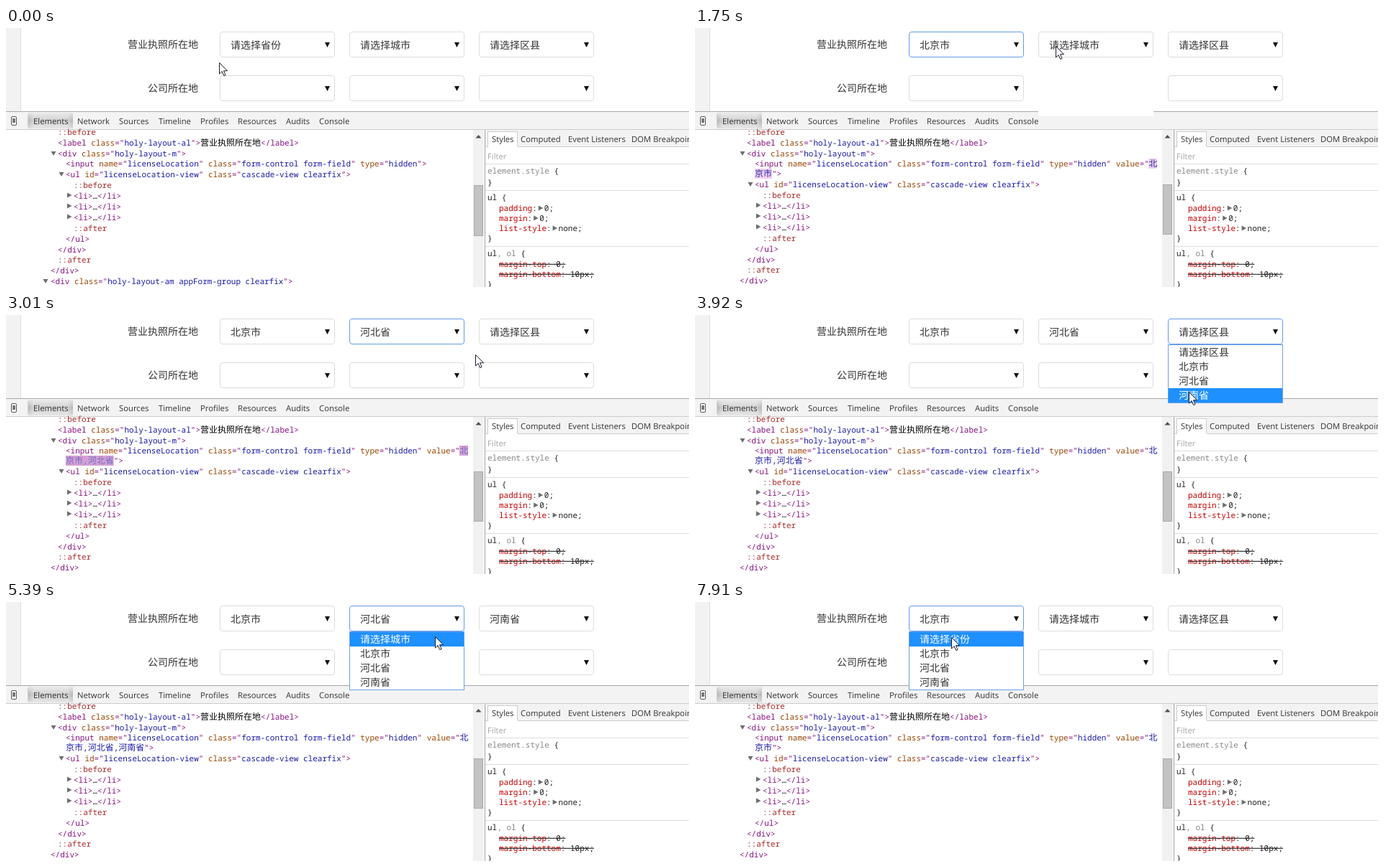
Recreate the animation shown at these times as an HTML page. Size 949 by 361 pixels, loop 8000 ms.

```html
<!DOCTYPE html>
<html lang="zh-CN">
<head>
<meta charset="utf-8">
<title>Cascade select</title>
<style>
html, body { margin: 0; width: 100%; height: 100%; overflow: hidden; background: #fff; }
svg { display: block; width: 949px; height: 361px; }
text { white-space: pre; text-rendering: geometricPrecision; }
.form { font: 14px "Noto Sans CJK SC", "Noto Sans CJK JP", sans-serif; fill: #333; }
.ui { font: 11.3px "Open Sans", "Noto Sans", sans-serif; fill: #333; }
.code { font: 11px "Noto Sans Mono", "DejaVu Sans Mono", monospace; fill: #881280; }
.css { font: 11px "Noto Sans Mono", "DejaVu Sans Mono", monospace; fill: #222; }
.zh { font: 12px "Noto Sans CJK SC", "Noto Sans CJK JP", sans-serif; }
.name { fill: #994500; }
.val { fill: #1a1aa6; }
.pseudo { fill: #a52a2a; }
.txt { fill: #000; }
.prop { fill: #c80000; }
.dim { fill: #888; }
.off { text-decoration: line-through; }
.tri { fill: #6e6e6e; }
</style>
</head>
<body>
<svg viewBox="0 0 949 361">
  <defs>
    <linearGradient id="tab">
      <stop offset="0" stop-color="#b4b4b4"/>
      <stop offset=".12" stop-color="#d2d2d2"/>
      <stop offset=".88" stop-color="#d2d2d2"/>
      <stop offset="1" stop-color="#b4b4b4"/>
    </linearGradient>
    <linearGradient id="shade" x2="0" y2="1">
      <stop offset="0" stop-color="#f3f3f3" stop-opacity=".75"/>
      <stop offset=".5" stop-color="#f3f3f3" stop-opacity="0"/>
      <stop offset="1" stop-color="#f3f3f3" stop-opacity=".6"/>
    </linearGradient>
  </defs>
  <rect width="949" height="361" fill="#fff"/>
  <rect width="20" height="116" fill="#f2f2f2"/>
  <rect x="20" width="1" height="116" fill="#ddd"/>
  <g id="fixed"></g>
  <g id="live"></g>
</svg>
<script>
const STEP = 70, LOOP = 8000, COLS = [297, 477, 657];
const PROMPTS = ['请选择省份', '请选择城市', '请选择区县'];
const PLACES = ['北京市', '河北省', '河南省'];

// time, x, y of the pointer
const PATH = [
  [0, 296, 48], [350, 345, 24], [420, 345, 24], [770, 379, 62], [980, 379, 62],
  [1750, 501, 25], [2030, 501, 25], [2380, 508, 86], [2520, 508, 86], [3010, 652, 55],
  [3220, 686, 27], [3430, 686, 27], [3920, 686, 107], [3990, 686, 107], [4830, 598, 25],
  [4970, 598, 25], [5390, 596, 48], [6020, 596, 48], [6510, 582, 52], [6790, 362, 25],
  [7490, 362, 25], [7700, 357, 41], [7770, 357, 41], [7910, 356, 49]
];
// blank popup, list shown, closed, column
const POPUPS = [
  [350, 420, 980, 0], [1750, 1820, 2590, 1], [3360, 3430, 4060, 2],
  [4830, 4900, 6090, 1], [7000, 7070, LOOP, 0]
];
// time of change, chosen option per column
const CHOICES = [
  [0, [0, 0, 0]], [980, [1, 0, 0]], [2590, [1, 2, 0]], [4060, [1, 2, 3]], [6090, [1, 0, 0]]
];
// the highlight stalls while a menu opens
const STALLS = [[1750, 2100], [3220, 3430], [6790, 7210]];

const $ = id => document.getElementById(id);
const rect = (x, y, w, h, fill, more = '') =>
  `<rect x="${x}" y="${y}" width="${w}" height="${h}" fill="${fill}" ${more}/>`;
const text = (cls, x, y, s, more = '') => `<text class="${cls}" x="${x}" y="${y}" ${more}>${s}</text>`;
const span = (cls, s) => `<tspan class="${cls}">${s}</tspan>`;
const zh = s => s.replace(/[\u4e00-\u9fff]+/g, m => span('zh', m));
const right = (x, y) => `<path class="tri" d="M${x} ${y - 3.5}l6.5 3.5l-6.5 3.5z"/>`;
const down = (x, y) => `<path class="tri" d="M${x - 3.5} ${y - 3}h7l-3.5 6z"/>`;
const tag = (name, attrs = {}, end = '&gt;') => '&lt;' + name +
  Object.entries(attrs).map(([k, v]) => ` ${span('name', k)}="${span('val', v)}"`).join('') + end;

function drawFixed() {
  const tabs = [['Elements', 38], ['Network', 99], ['Sources', 157], ['Timeline', 212],
    ['Profiles', 270], ['Resources', 322], ['Audits', 389], ['Console', 435]];
  const panes = [['Styles', 675], ['Computed', 715], ['Event Listeners', 781], ['DOM Breakpoints', 869]];
  const rule = (y, s) => text('css', 669, y + 4, s);
  const decl = (y, prop, value, arrow) => {
    const x = 685 + (prop.length + 1) * 6.6;
    return text('css', 685, y + 4, span('prop', prop) + ':') +
      (arrow ? right(x + 2, y) : '') + text('css', x + 10, y + 4, value);
  };
  const dead = (y, prop, value) =>
    text('css off', 685, y + 4, `${span('prop', prop)}: ${value};`);

  return text('form', 169, 28, '营业执照所在地') + text('form', 197, 89, '公司所在地') +
    rect(0, 116, 949, 1, '#a8a8a8') + rect(0, 117, 949, 24, '#f3f3f3') + rect(0, 141, 949, 1, '#ccc') +
    rect(31, 118, 62, 22, 'url(#tab)') + rect(31, 118, 62, 22, 'url(#shade)') +
    rect(30, 120, 1, 18, '#ccc') +
    rect(7.5, 123.5, 7, 12, '#fff', 'rx="1.5" stroke="#555"') + rect(9, 126, 4, 6, '#777') +
    tabs.map(([s, x]) => text('ui', x, 134, s)).join('') +
    rect(649, 142, 15, 219, '#f1f1f1') + '<path d="M652.500 153.500h8l-4 -4.500z" fill="#505050"/>' +
    rect(665, 142, 1, 219, '#a3a3a3') +
    rect(666, 142, 283, 23, '#f3f3f3') + rect(666, 165, 283, 1, '#ccc') +
    rect(669.5, 144.5, 41, 21, '#fff', 'stroke="#ccc"') + rect(670, 165, 41, 1, '#fff') +
    panes.map(([s, x]) => text('ui', x, 159, s)).join('') +
    text('ui', 669, 183, 'Filter', 'style="fill:#a5a5a5"') +
    [189, 226, 304].map(y => rect(666, y, 283, 1, '#ddd')).join('') +
    rule(199, span('dim', 'element.style') + ' {') + rule(215, '}') +
    rule(236, 'ul {') + decl(251, 'padding', '0;', true) + decl(265, 'margin', '0;', true) +
    decl(279, 'list-style', 'none;', true) + rule(293, '}') +
    rule(314, 'ul' + span('dim', ', ol') + ' {') +
    dead(329, 'margin-top', '0') + dead(343, 'margin-bottom', '10px') + rule(357, '}');
}

function ease(x) {
  let lo = 0, hi = 1, s = .5;
  for (let i = 0; i < 20; i++) {
    s = (lo + hi) / 2;
    const bx = .75 * s * (1 - s) + s * s * s;
    if (bx < x) lo = s; else hi = s;
  }
  return .3 * s * (1 - s) * (1 - s) + 3 * s * s * (1 - s) + s * s * s;
}

const mix = (a, b, k) => `rgb(${a.map((v, i) => Math.round(v + (b[i] - v) * k))})`;

function flash(age) {
  const strong = [158, 54, 153], pale = [245, 219, 244], white = [255, 255, 255], ink = [26, 26, 166];
  const k = age / 1400;
  if (k >= 1) return { back: 'none', ink: mix(ink, ink, 0) };
  if (k >= .8) return { back: mix(pale, white, ease((k - .8) / .2)), ink: mix(ink, ink, 0) };
  const e = ease(k / .8);
  return { back: mix(strong, pale, e), ink: mix(white, ink, e) };
}

function pointer(t) {
  const i = PATH.findIndex(p => p[0] > t);
  if (i < 0) return PATH[PATH.length - 1].slice(1);
  const [t0, x0, y0] = PATH[i - 1], [t1, x1, y1] = PATH[i];
  const k = (t - t0) / (t1 - t0);
  return [Math.round(x0 + (x1 - x0) * k), Math.round(y0 + (y1 - y0) * k)];
}

function drawTree(t, since, picks) {
  const wrapped = since > 0, shift = wrapped ? 14 : 0;
  const mid = i => 145 + 15 * i - (i > 2) - (i > 11) + (i > 3 ? shift : 0);
  const row = (i, x, s) => text('code', x, mid(i) + 4, s);
  const input = tag('input', {
    name: 'licenseLocation', class: 'form-control form-field', type: 'hidden'
  }, wrapped ? ` ${span('name', 'value')}="` : '&gt;');
  let out = rect(650.5, wrapped ? 218.5 : 219.5, 12, wrapped ? 69 : 70, '#c3c3c3', 'stroke="#a9a9a9"');

  if (wrapped) {
    const stall = STALLS.find(([a, b]) => t >= a && t < b);
    const f = flash((stall ? stall[0] : t) - since);
    const value = picks.filter(Boolean).map(n => PLACES[n - 1]).join();
    const head = value[0], rest = value.slice(1);
    const width = [...rest].reduce((w, c) => w + (c === ',' ? 6.6 : 12), 0);
    const inked = s => `<tspan fill="${f.ink}">${zh(s)}</tspan>`;
    out += rect(630, 182, 12, 14, f.back) + rect(83, 196, width, 14, f.back) +
      text('code', 630.5, 193, inked(head)) + text('code', 83, 207, inked(rest) + '"&gt;');
  }
  out += row(0, 72, span('pseudo', '::before')) +
    row(1, 72, tag('label', { class: 'holy-layout-al' }) + span('txt', zh('营业执照所在地')) + tag('/label')) +
    row(2, 72, tag('div', { class: 'holy-layout-m' })) + down(66, mid(2)) +
    row(3, 83, input) +
    row(4, 83, tag('ul', { id: 'licenseLocation-view', class: 'cascade-view clearfix' })) + down(77, mid(4)) +
    row(5, 94, span('pseudo', '::before'));
  for (const i of [6, 7, 8]) out += row(i, 94, tag('li') + span('txt', '…') + tag('/li')) + right(85, mid(i) - 1);
  return out + row(9, 94, span('pseudo', '::after')) + row(10, 83, tag('/ul')) +
    row(11, 72, tag('/div')) + row(12, 72, span('pseudo', '::after')) + row(13, 62, tag('/div')) +
    row(14, 62, tag('div', { class: 'holy-layout-am appForm-group clearfix' })) + down(55, mid(14));
}

function drawSelect(x, y, label, focused) {
  return rect(x + .5, y + .5, 159, 35, '#fff', `rx="3.5" stroke="${focused ? '#639bef' : '#dcdcdc'}"`) +
    text('form', x + 15, y + 24, label) +
    `<path d="M${x + 146} ${y + 15}h7l-3.5 7z" fill="#111"/>`;
}

function drawPopup(t, [, listed, , col], picked, y) {
  const x = COLS[col];
  if (t < listed) return rect(x, 41, 160, 82, '#fff', 'rx="1"');
  const hover = y >= 42 ? Math.floor((y - 42) / 20) : picked;
  return rect(x + .5, 41.5, 159, 81, '#fff', 'stroke="#6f9fe4"') +
    [PROMPTS[col], ...PLACES].map((s, i) =>
      (i === hover ? rect(x + 1, 42 + 20 * i, 158, 20, '#1e90ff') : '') +
      text('form', x + 15, 57 + 20 * i, s, i === hover ? 'style="fill:#fff"' : '')).join('');
}

function draw(t) {
  const [since, picks] = CHOICES.filter(c => c[0] <= t).pop();
  const opened = POPUPS.filter(p => p[1] <= t).pop();
  const popup = POPUPS.find(p => t >= p[0] && t < p[2]);
  const [x, y] = pointer(t);
  const label = i => picks[i] ? PLACES[picks[i] - 1] : PROMPTS[i];

  $('live').innerHTML = drawTree(t, since, picks) +
    COLS.map((cx, i) => drawSelect(cx, 5, label(i), opened && opened[3] === i) +
      drawSelect(cx, 66, '', false)).join('') +
    (popup ? drawPopup(t, popup, picks[popup[3]], y) : '') +
    `<path transform="translate(${x + .5} ${y + .5})" d="M0 0V15.500L3.600 12L6.200 18L8.600 17L6 11.200H11Z"
      fill="#fff" stroke="#1c1c2c"/>`;
}

$('fixed').innerHTML = drawFixed();
let last = -1;
function tick() {
  const t = Math.floor(performance.now() % LOOP / STEP) * STEP;
  if (t !== last) draw(last = t);
  requestAnimationFrame(tick);
}
tick();
</script>
</body>
</html>
```
